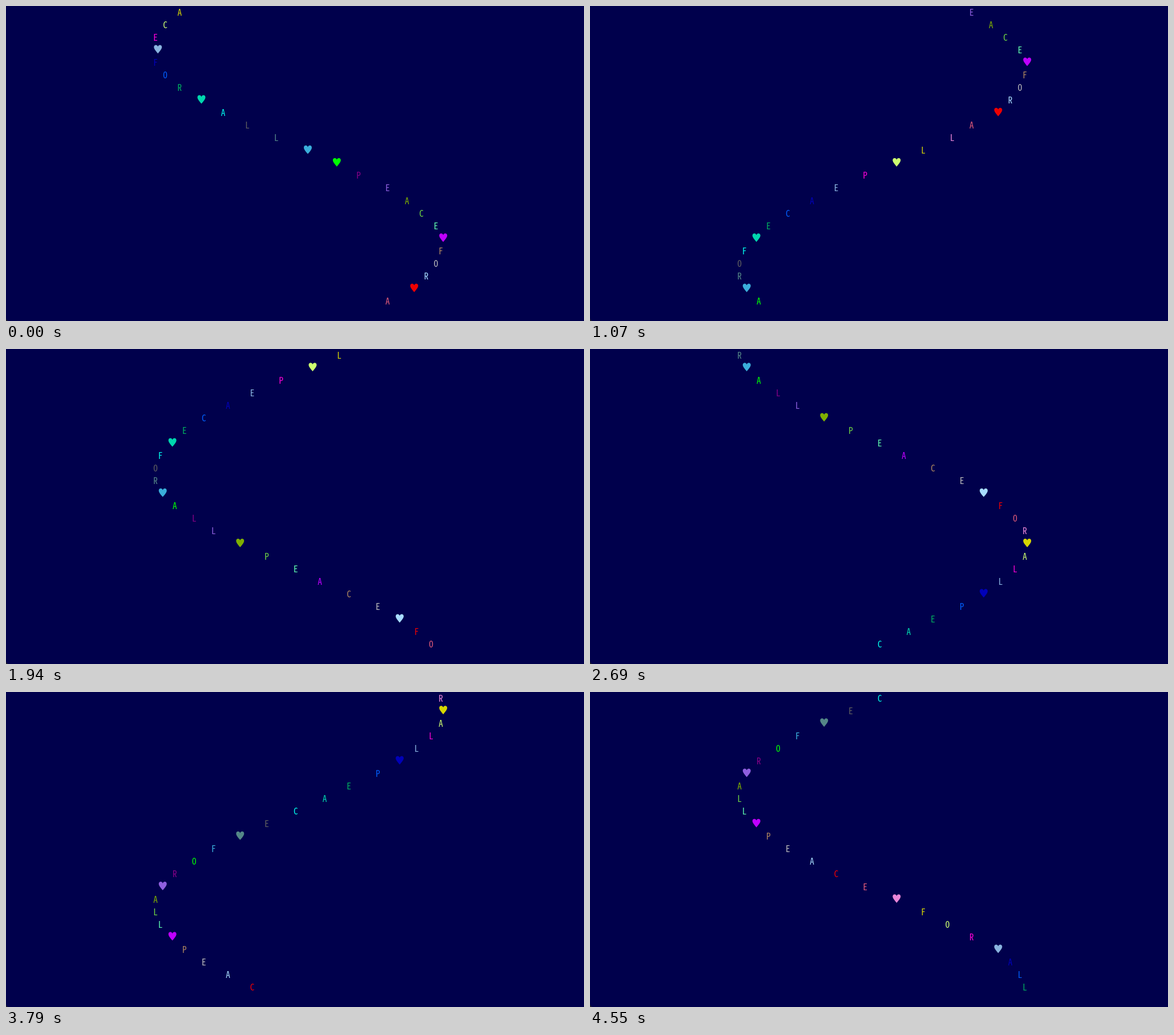
Animation, 1013 px wide and 553 px high, one loop 4.57 s. Source, as an HTML page:

```html
<!DOCTYPE html>
<html lang="en">
<head>
<meta charset="utf-8">
<title>Peace for all</title>
<style>
  html, body { margin: 0; width: 100%; height: 100%; overflow: hidden; background: #00004c; }
  svg { display: block; width: 100%; height: 100%; }
  text { font: 15.2px "Noto Sans Mono CJK JP", "Noto Sans Mono", monospace; text-anchor: middle; }
</style>
</head>
<body>
<svg viewBox="0 0 1013 553">
  <rect width="1013" height="553" fill="#00004c"/>
  <path d="M0 547Q0 553 6 553H0Z" fill="#22222c"/>
  <g id="rows"></g>
</svg>
<script>
const LOOP = 4570, ROWS = 24, ROW_H = 22.06, CELL = 8.475, LEFT = 262;
const WORDS = 'PEACE♥FOR♥ALL♥';
const COLORS = ('d7d700 cdff70 ff00d7 8ab4e0 0000b8 005fff 00af5f 00d7af 00ffee 5f5f5f 548787 3aaedb ' +
  '00ff00 870087 8f5fdf 7faf00 70d742 5fffaf bf00ff af875f bcbcbc a8dcff ee0000 e05a78 ea86d9').split(' ');
const HEART = 'M0 7.6C-2.2 4.8-7-.2-7-3.6C-7-6-5.5-7.4-3.6-7.4C-1.8-7.4-.5-6.2 0-4.6' +
  'C.5-6.2 1.8-7.4 3.6-7.4C5.5-7.4 7-6 7-3.6C7-.2 2.2 4.8 0 7.6Z';

// The terminal redraws on a steady tick; on these ticks no new line has arrived.
const TICK = 58.04, DOUBLE = 54;
const IDLE = [3, 6, 10, 14, 18, 23, 27, 31, 35, 38, 41, 46, 48, 50, 53, 57, 61, 66, 69, 73, 76];

const rows = document.getElementById('rows');
let shown = -1;

function topLine(t) {
  const k = Math.floor((Math.floor(t / 10) * 10 - 75) / TICK);
  if (k < 0) return 0;
  return k + 1 - IDLE.filter(i => i <= k).length + (k >= DOUBLE ? 1 : 0);
}

const column = n => Math.floor(30.003 + 29.76 * Math.sin(0.2 * n - 8.4316));

// The phrase restarts at line 12, so its last heart appears twice in a row.
const letter = n => WORDS[(n + (n < 12 ? 2 : 1)) % WORDS.length];

function line(n, row) {
  const x = LEFT + column(n) * CELL, y = row * ROW_H;
  const ch = letter(n), fill = '#' + COLORS[n % COLORS.length];
  return ch === '♥'
    ? `<path d="${HEART}" fill="${fill}" transform="translate(${x + CELL / 2} ${y + 9.6})"/>`
    : `<text x="${x}" y="${y + 16.6}" fill="${fill}">${ch}</text>`;
}

function draw(t) {
  const top = topLine(t % LOOP);
  if (top === shown) return;
  shown = top;
  rows.innerHTML = Array.from({ length: ROWS }, (_, r) => line(top + r, r)).join('');
}

const start = performance.now();
function frame() {
  draw(performance.now() - start);
  requestAnimationFrame(frame);
}
frame();
</script>
</body>
</html>
```
